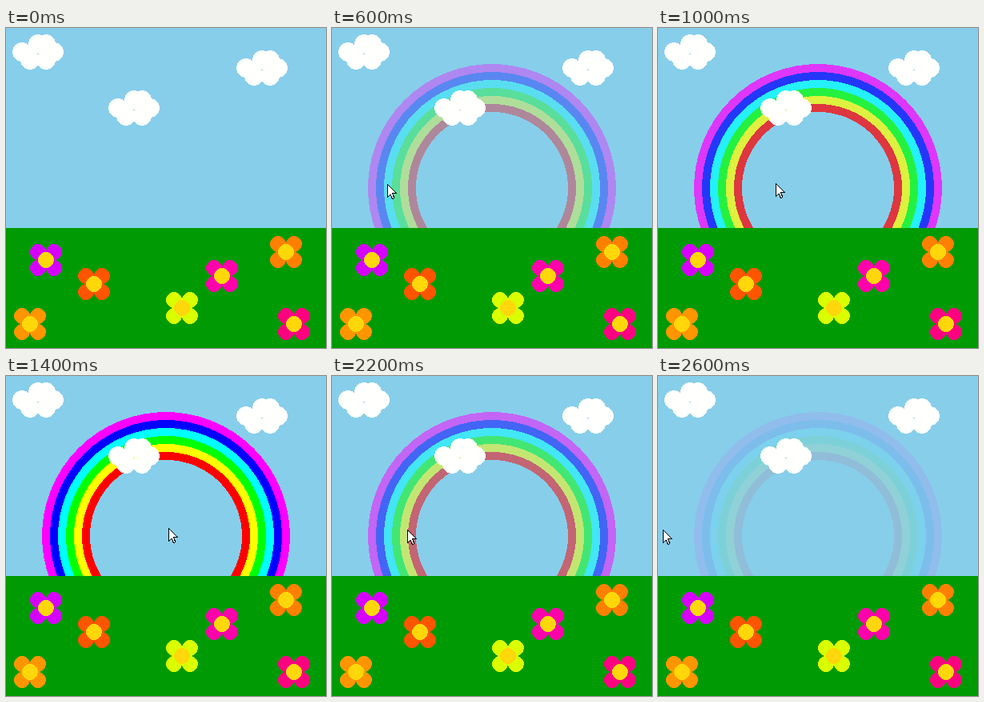
Animation, 400 px wide and 400 px high, one loop 2800 ms. Source, as an HTML page:

```html
<!DOCTYPE html>
<html lang="en">
<head>
<meta charset="utf-8">
<title>Rainbow</title>
<style>
html, body { margin: 0; width: 100%; height: 100%; overflow: hidden; }
svg { display: block; shape-rendering: crispEdges; }
</style>
</head>
<body>
<svg width="400" height="400">
  <defs>
    <g id="cloud" fill="#fffffe">
      <circle cx="-20" r="12"/><circle cx="20" r="12"/>
      <circle cx="-10" cy="10" r="12"/><circle cx="10" cy="10" r="12"/>
      <circle cy="-10" r="12"/><circle cx="10" cy="-10" r="12"/>
    </g>
    <g id="flower">
      <circle cx="-10" cy="-10" r="10"/><circle cx="10" cy="-10" r="10"/>
      <circle cx="-10" cy="10" r="10"/><circle cx="10" cy="10" r="10"/>
      <circle r="10" fill="#ffd70a"/>
    </g>
  </defs>
  <rect width="400" height="400" fill="#87ceeb"/>
  <g id="rainbow" fill="none" stroke-width="10"></g>
  <rect y="250" width="400" height="150" fill="#009a04"/>
  <use href="#cloud" x="40" y="30"/>
  <use href="#cloud" x="320" y="50"/>
  <use href="#cloud" x="160" y="100"/>
  <use href="#flower" x="50" y="290" fill="#d500ff"/>
  <use href="#flower" x="110" y="320" fill="#ff5500"/>
  <use href="#flower" x="270" y="310" fill="#ff00aa"/>
  <use href="#flower" x="350" y="280" fill="#ff8000"/>
  <use href="#flower" x="220" y="350" fill="#d9ff00"/>
  <use href="#flower" x="30" y="370" fill="#ff9500"/>
  <use href="#flower" x="360" y="370" fill="#ff0080"/>
  <path id="pointer" fill="#fff" stroke="#000"
    d="M.5 .5V16.5L4 13L6.5 18.5H8L8.5 16.5L6.5 12V11.5H11.5Z"/>
</svg>
<script>
const LOOP = 2800, STEP = 200, ENTER = 400, PEAK = 1400;
const rainbow = document.getElementById('rainbow');
const pointer = document.getElementById('pointer');

rainbow.innerHTML = ['#f00', '#ff0', '#0f0', '#0ff', '#00f', '#f0f']
  .map((color, i) => `<circle cx="200" cy="200" r="${100 + i * 10}" stroke="${color}"/>`)
  .join('');

// The pointer sweeps right to its peak, then back left off the rainbow.
function pointerAt(t) {
  const [span, time, power, drop] = t < PEAK ? [177, 1000, 1.26, 6] : [197, 1200, 1.45, 2];
  const away = Math.abs(t - PEAK) / time;
  return { x: 203 - span * away ** power, y: 190 + drop * Math.sqrt(away) };
}

function draw(now) {
  const t = Math.floor((now % LOOP) / STEP) * STEP;
  const shown = t >= ENTER;
  const { x, y } = pointerAt(t);
  pointer.setAttribute('visibility', shown ? 'visible' : 'hidden');
  pointer.setAttribute('transform', `translate(${Math.round(x)} ${Math.round(y)})`);
  // Opacity follows the pointer with a slight lag
  const alpha = (pointerAt(t - 25).x + 3) / 200;
  rainbow.setAttribute('opacity', shown ? Math.min(1, alpha) : 0);
}

const start = performance.now();
function tick() {
  draw(performance.now() - start);
  requestAnimationFrame(tick);
}
tick();
</script>
</body>
</html>
```
